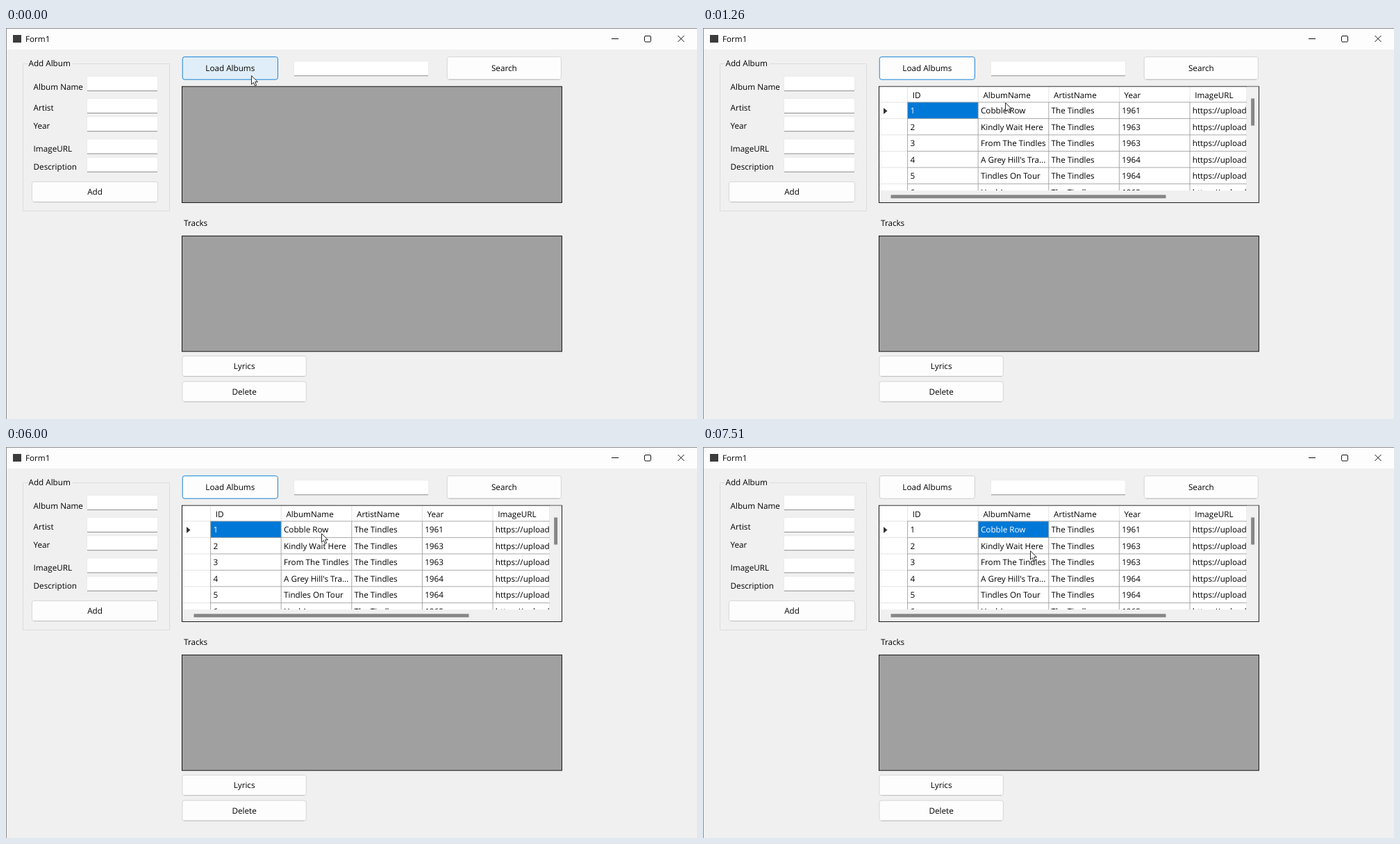
Animation of 995 by 563 pixels, one loop 8 s. Source, as an HTML page:

```html
<!DOCTYPE html>
<html lang="en">
<head>
<meta charset="utf-8">
<title>Form1</title>
<style>
html, body { margin: 0; width: 100%; height: 100%; overflow: hidden; background: #f0f0f0; }
svg { display: block; width: 100vw; height: 100vh; }
text { font: 11.7px "Open Sans", "Noto Sans", sans-serif; fill: #000; text-rendering: geometricPrecision; white-space: pre; }
</style>
</head>
<body>
<svg id="stage" viewBox="0 0 995 563"></svg>
<script>
const LOOP = 8000;
const svg = document.getElementById('stage');

const rect = (x, y, w, h, fill, more = '') =>
  `<rect x="${x}" y="${y}" width="${w}" height="${h}" fill="${fill}" ${more}/>`;
const line = (d, color, more = '') =>
  `<path d="${d}" fill="none" stroke="${color}" ${more}/>`;
// y is the middle of the capital letters
const text = (x, y, s, more = '') =>
  `<text x="${x}" y="${y + 4.1}" ${more}>${s}</text>`;

function button(x, y, w, h, label, id = '') {
  return rect(x + .4, y + .4, w - .8, h - .8, '#fdfdfd',
    `rx="3" stroke="#d2d2d2" stroke-width=".9" ${id && `id="${id}"`}`) +
    (id ? '' : line(`M${x + 3} ${y + h - .4}h${w - 6}`, '#bcbcbc', 'stroke-width=".9"')) +
    text(x + w / 2, y + h / 2, label, 'text-anchor="middle"');
}

function field(x, y, w) {
  return rect(x + .5, y + .5, w - 1, 21, '#fff', 'rx="1.5" stroke="#ebebeb"') +
    line(`M${x + 1} ${y + 21.5}h${w - 2}`, '#868686', 'stroke-width=".9"');
}

const panel = (y, h) => rect(253.4, y, 547, h, '#a0a0a0', 'stroke="#000" stroke-width=".9"');

function chrome() {
  return rect(0, 0, 995, 563, '#f0f0f0') + rect(0, 0, 995, 31, '#fdfdfd') +
    line('M0 .5H995M.5 0V563', '#8e8e8e') +
    rect(10, 10, 12, 11, '#3c3c3c') + text(28, 16, 'Form1') +
    line('M872 15.5h10M967.5 11l9 9m0-9l-9 9', '#111') +
    rect(919.5, 11.5, 9, 8.5, 'none', 'rx="1.5" stroke="#111"');
}

function albumForm() {
  const fields = [['Album Name', 85, 69], ['Artist', 115, 101], ['Year', 141, 127.2],
    ['ImageURL', 173.5, 159.5], ['Description', 199.5, 185.7]];
  return line('M31 51.5H24.5V263.5H235.5V51.5H96', '#dcdcdc') + text(32.5, 51, 'Add Album') +
    fields.map(([s, ty, y]) => text(39.6, ty, s) + field(116, y, 103)).join('') +
    button(37, 221, 182, 30, 'Add');
}

const TOP = 106.9, PITCH = 23.5, LEFT = 294.6, COL = 101.6;
const edge = c => LEFT + COL * c;
const HEADS = ['ID', 'AlbumName', 'ArtistName', 'Year', 'ImageURL'];
const ALBUMS = [['Cobble Row', 1961], ['Kindly Wait Here', 1963], ['From The Tindles', 1963],
  ["A Grey Hill's Tra...", 1964], ['Tindles On Tour', 1964], ['Hush!', 1965]];

function table() {
  let cells = rect(254, 84.5, 529, 149.5, '#fff') +
    rect(0, TOP, COL, PITCH, '#0078d7', 'id="pick"');
  HEADS.forEach((head, c) => {
    cells += line(`M${edge(c)} 85V107`, '#e3e3e3') +
      line(`M${edge(c)} 107V234`, '#a0a0a0', 'stroke-width=".9"') +
      text(edge(c) + 7.2, 96.5, head);
  });
  ALBUMS.forEach(([name, year], r) => {
    const y = TOP + r * PITCH;
    cells += line(`M254 ${y}H294`, '#e3e3e3') +
      line(`M294 ${y}H783`, '#a0a0a0', 'stroke-width=".9"');
    [r + 1, name, 'The Tindles', year, 'https://upload'].forEach((s, c) => {
      cells += text(edge(c) + 3.8, y + 12.1, s, r ? '' : `id="cell${c}"`);
    });
  });
  return `<g id="table"><g clip-path="url(#view)">${cells}
    <path d="M260 115l5.5 4.5-5.5 4.5z" fill="#333"/></g>` +
    rect(783, 84.5, 17, 166.4, '#f0f0f0') + rect(254, 234, 529, 16.9, '#f0f0f0') +
    rect(270.5, 240.3, 396, 4.9, '#868686') + rect(789.2, 101.5, 4.9, 39, '#868686') + '</g>';
}

function loading() {
  return '<g id="loading">' + rect(254, 84.5, 40.5, 22.9, '#fff') +
    rect(270.5, 234, 495.5, 16.9, '#f0f0f0') + rect(270.5, 240.3, 410, 4.9, '#868686') + '</g>';
}

svg.innerHTML = '<clipPath id="view"><rect x="254" y="84.5" width="528.8" height="149.5"/></clipPath>' +
  chrome() + albumForm() +
  button(253.8, 41.2, 138, 33.4, 'Load Albums', 'load') + field(414, 47.3, 195) +
  button(634.8, 41.2, 165, 33.4, 'Search') +
  panel(84.2, 167.2) + loading() + table() +
  text(256, 281, 'Tracks') + panel(299.4, 166.4) +
  button(253.5, 472, 179.2, 30, 'Lyrics') + button(253.5, 508.6, 179.2, 30, 'Delete') +
  `<path id="pointer" d="M.5 .7V13.2L3.4 10.5L5.4 15.2L7.6 14.3L5.6 9.7H9.5Z"
    fill="#fff" stroke="#111" stroke-width=".9" stroke-linejoin="round"/>`;

const el = id => document.getElementById(id);
const parts = Object.fromEntries(
  ['load', 'loading', 'table', 'pick', 'cell0', 'cell1', 'pointer'].map(id => [id, el(id)]));

// time, x, y of each pointer jump
const STOPS = [[0, 353, 68], [430, 394, 88], [550, 435, 107], [1650, 505, 114], [1900, 435, 135]];
for (let i = 0; i < 5; i++) STOPS.push([2050 + 125 * i, Math.round(446 - 7.75 * i), 143 - 6 * i]);
STOPS.push([6000, 454, 124], [6630, 470, 147], [6800, 471, 148], [6940, 471, 149]);

function draw(t) {
  const loaded = t >= 1260, picked = t >= 7510;
  const [, x, y] = STOPS.filter(s => s[0] <= t).pop();
  parts.pointer.setAttribute('transform', `translate(${x} ${y})`);
  parts.loading.style.display = t >= 1110 && !loaded ? '' : 'none';
  parts.table.style.display = loaded ? '' : 'none';
  parts.load.setAttribute('fill', loaded ? '#fdfdfd' : '#e0eef9');
  parts.load.setAttribute('stroke', picked ? '#cacaca' : '#0078d4');
  parts.pick.setAttribute('x', edge(picked ? 1 : 0));
  parts.cell0.style.fill = picked ? '' : '#fff';
  parts.cell1.style.fill = picked ? '#fff' : '';
}

const start = performance.now();
function tick() {
  draw((performance.now() - start) % LOOP);
  requestAnimationFrame(tick);
}
tick();
</script>
</body>
</html>
```
